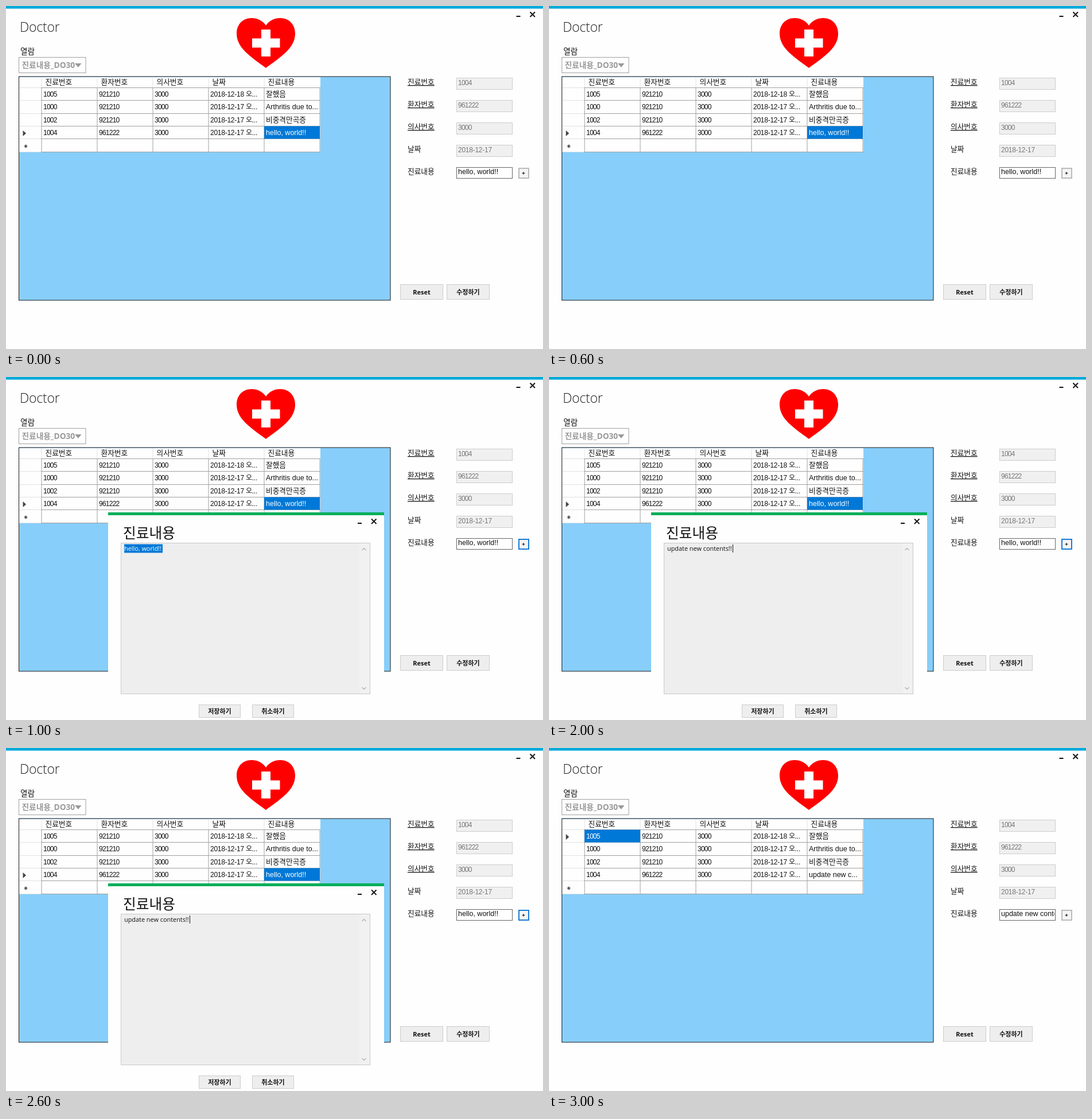
Recreate the animation shown at these times as an HTML page. Size 936 by 598 pixels, loop 4 s.

```html
<!DOCTYPE html>
<html lang="ko">
<head>
<meta charset="utf-8">
<style>
  html, body { margin: 0; width: 100%; height: 100%; overflow: hidden; background: #fefefe; }
  svg { display: block; width: 936px; height: 598px; }
  text { font: 12.5px "Liberation Sans", "Noto Sans CJK KR", sans-serif; white-space: pre; }
  .id { font-size: 12px; letter-spacing: -.75px; }
  .date { font-size: 12px; letter-spacing: -.25px; }
  .ko { font: 12.7px "Noto Sans CJK KR", sans-serif; }
  .key { text-decoration: underline; }
  .ui { font: 500 10.9px "Open Sans", sans-serif; }
  .btn { font: bold 11px "Open Sans", "Noto Sans CJK KR", sans-serif; text-anchor: middle; }
  .title { font: 300 23px "Open Sans", sans-serif; letter-spacing: -.2px; }
  .head { font: 24.7px "Noto Sans CJK KR", sans-serif; }
  .combo { font: bold 13.7px "Open Sans", "Noto Sans CJK KR", sans-serif; }
</style>
</head>
<body>
<svg id="stage" viewBox="0 0 936 598">
  <clipPath id="comboClip"><path d="M22 89h102v28H22z"/></clipPath>
  <clipPath id="inputClip"><path d="M786 282h95v18h-95z"/></clipPath>
</svg>
<script>
const stage = document.getElementById('stage');
let parent = stage;

function add(tag, attrs, content = '') {
  const el = document.createElementNS('http://www.w3.org/2000/svg', tag);
  for (const k in attrs) el.setAttribute(k, attrs[k]);
  el.textContent = content;
  return parent.appendChild(el);
}
const text = (s, x, y, cls = '', fill = '#111', more = {}) =>
  add('text', { x, y, class: cls, fill, ...more }, s);
const path = (d, fill, stroke = 'none', width = 1) =>
  add('path', { d, fill, stroke, 'stroke-width': width });
const rect = (x, y, width, height, fill) => add('rect', { x, y, width, height, fill });
const box = (x, y, w, h, fill, stroke) =>
  add('rect', { x: x + .5, y: y + .5, width: w - 1, height: h - 1, fill, stroke });
const show = (el, on) => el.setAttribute('display', on ? 'inline' : 'none');

function button(label, x, y, w, h) {
  box(x, y, w, h, '#eee', '#ccc');
  text(label, x + w / 2, y + h / 2 + 4, 'btn');
}
function controls(x, y) {
  rect(x - 24, y + 6.5, 7, 2, '#111');
  path(`M${x} ${y}l8.5 8.5m0 -8.5l-8.5 8.5`, 'none', '#111', 1.9);
}

// Window
rect(0, 0, 936, 4.6, '#00aadb');
controls(913.5, 10.5);
text('Doctor', 24, 45, 'title', '#222');
text('열람', 25, 84, 'ko', '#111', { style: 'font-size:13.6px' });
box(22, 89, 117.5, 28, '#fefefe', '#a0a0a0');
text('진료내용_DO30', 27.5, 108, 'combo', '#999', { 'clip-path': 'url(#comboClip)' });
path('M120 100h11.5l-5.7 7z', '#999');

path('M453 34C459 25 468 21 478 21C493 21 504 32 504 48C504 73 480 88 453 108' +
     'C426 88 402 73 402 48C402 32 413 21 428 21C438 21 447 25 453 34Z', '#fe0000');
path('M445 41h16v15.5h16.5v16h-16.5v15.5h-16v-15.5h-16v-16h16z', '#fff');

// Table
const names = ['진료번호', '환자번호', '의사번호', '날짜', '진료내용'];
const rows = [
  ['1005', '921210', '3000', '2018-12-18 오...', '잘했음'],
  ['1000', '921210', '3000', '2018-12-17 오...', 'Arthritis due to...'],
  ['1002', '921210', '3000', '2018-12-17 오...', '비중격만곡증'],
  ['1004', '961222', '3000', '2018-12-17 오...', 'hello, world!!'],
];
const colX = c => 62 + 97 * c;
const rowY = r => 142 + Math.round(22.3 * r);
const cellClass = (s, c) => c < 3 ? 'id' : c === 3 ? 'date' : /[가-힣]/.test(s) ? 'ko' : '';

box(22, 122.5, 648.5, 391, '#87cefa', '#1a1a1a');
rect(23, 124, 525, 131, '#fefefe');
for (let r = 0; r < 6; r++) {
  rect(23, rowY(r), 39, 1, '#e2e2e2');
  rect(61, rowY(r), 487, 1, '#a0a0a0');
}
for (let c = 0; c < 6; c++) {
  if (c < 5) rect(colX(c) - .5, 125, 1, 17, '#e2e2e2');
  rect(colX(c) - .5, 142, 1, 113, '#a0a0a0');
}
const selection = rect(0, 0, 97, 22, '#0078d7');
const marker = path('M29.5 -5l5.5 5l-5.5 5z', '#444');
path('M31.5 244.5h6m-5 -2.2l4 4.4m0 -4.4l-4 4.4m2 -5.2v6', 'none', '#555', 1.1);

names.forEach((s, c) => text(s, colX(c) + 6.5, 137.3, 'ko'));
const cells = rows.map((row, r) => row.map((s, c) =>
  text(s, colX(c) + 3, rowY(r) + 15.5, cellClass(s, c))));

// Detail fields
['1004', '961222', '3000', '2018-12-17', ''].forEach((s, i) => {
  const y = 125 + Math.round(38.9 * i);
  text(names[i], 700, y + 12, i < 3 ? 'ko key' : 'ko');
  if (i < 4) {
    box(785, y, 98, 21, '#f0f0f0', '#ccc');
    text(s, 788, y + 12.7, i < 3 ? 'id' : 'date', '#777');
  }
});
box(785, 281, 98, 20, '#fefefe', '#666');
const input = text('', 788, 293, '', '#111', { 'clip-path': 'url(#inputClip)' });
const plus = path('M894 283h17v17h-17z', '#f4f4f4', '', 2);
path('M899.7 291.5h4.6m-2.3 -2.3v4.6', 'none', '#111', 1.2);
button('Reset', 687, 485, 75, 27);
button('수정하기', 768, 485, 75, 27);

// Dialog
const dialog = parent = add('g', {});
rect(178, 236, 481, 362, '#fefefe');
rect(178, 236, 481, 5, '#00ae59');
controls(637, 247.5);
text('진료내용', 204, 280.5, 'head');
box(200, 289, 435, 264, '#eee', '#c8c8c8');
rect(616, 290, 18, 262, '#f1f1f1');
path('M620.5 302l3.5 -3.5l3.5 3.5M620.5 541l3.5 3.5l3.5 -3.5', 'none', '#b5b5b5', 1.4);
const highlight = rect(206, 291.5, 67, 15, '#0078d7');
const note = text('', 206, 303, 'ui');
const caret = rect(320, 292, 1, 14, '#111');
button('저장하기', 336, 571, 73, 23);
button('취소하기', 429, 571, 73, 23);

function draw(step) {
  const open = step === 1 || step === 2, editing = step === 2, saved = step === 3;
  show(dialog, open);
  plus.setAttribute('stroke', open ? '#1a7bd6' : '#bbb');
  show(highlight, !editing);
  show(caret, editing);
  note.textContent = editing ? 'update new contents!!' : 'hello, world!!';
  note.setAttribute('fill', editing ? '#111' : '#fff');

  const [r, c] = saved ? [0, 0] : [3, 4];
  selection.setAttribute('x', colX(c));
  selection.setAttribute('y', rowY(r) + .5);
  marker.setAttribute('transform', `translate(0 ${rowY(r) + 13})`);
  cells[0][0].setAttribute('fill', saved ? '#fff' : '#111');
  cells[3][4].setAttribute('fill', saved ? '#111' : '#fff');
  cells[3][4].textContent = saved ? 'update new c...' : 'hello, world!!';
  input.textContent = saved ? 'update new contents!!' : 'hello, world!!';
}

let last = -1;
const start = performance.now();
function tick() {
  const step = Math.floor((performance.now() - start) / 1000) % 4;
  if (step !== last) draw(last = step);
  requestAnimationFrame(tick);
}
tick();
</script>
</body>
</html>
```
